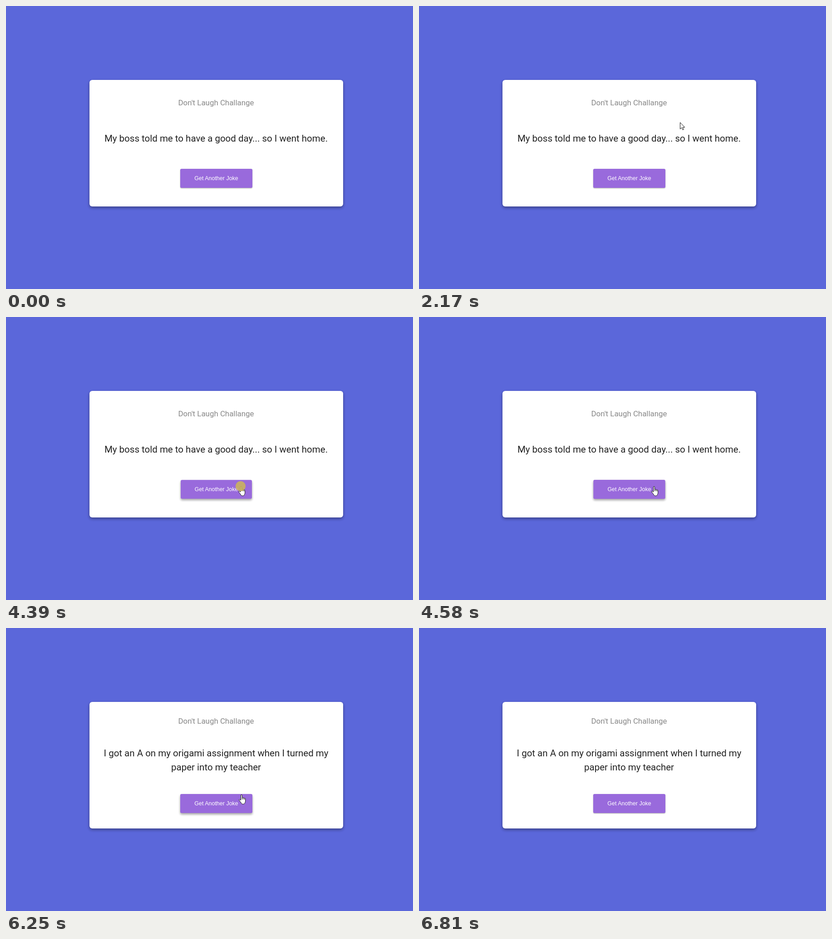
An HTML page for the animation above (8630 ms loop, 897 px wide and 624 px high).

```html
<!DOCTYPE html>
<html lang="en">
<head>
<meta charset="utf-8">
<title>Don't Laugh Challange</title>
<style>
  :root { --loop: 8630ms; }
  html, body { margin: 0; width: 100%; height: 100%; overflow: hidden; }
  body { background: #5b67da; position: relative; }

  .card, .btn, .text, .cursor, .cursor svg, .ring { position: absolute; }

  .card {
    left: 184px; top: 163px; width: 559px; height: 279px;
    background: #fff; border-radius: 6px;
    box-shadow: 0 3px 6px rgba(0,0,0,.16), 0 3px 6px rgba(0,0,0,.23);
  }

  .text { left: 0; top: 0; font-family: Roboto, sans-serif; text-anchor: middle; }
  .title { font-size: 16.9px; fill: #888; }
  .joke { font-size: 20.5px; fill: #222; }
  .first { animation: first var(--loop) step-end infinite; }
  .second { animation: second var(--loop) step-end infinite; }
  @keyframes first { 0% { visibility: visible } 53.65%, 100% { visibility: hidden } }
  @keyframes second { 0% { visibility: hidden } 53.65%, 100% { visibility: visible } }

  .btn {
    left: 384px; top: 359px; width: 159px; height: 42px;
    border-radius: 3px; background: #996adc; color: #fff;
    font: 12.5px/42px "Liberation Sans", Arial, sans-serif; text-align: center;
    animation: drop var(--loop) step-end infinite,
               hover var(--loop) linear infinite,
               press var(--loop) linear infinite;
  }
  @keyframes drop { 0% { top: 359px } 53.65%, 100% { top: 366px } }
  @keyframes hover {
    0%, 28.6%, 75.3%, 100% { box-shadow: 0 1px 3px rgba(0,0,0,.12), 0 1px 2px rgba(0,0,0,.24) }
    30.9%, 73% { box-shadow: 0 3px 5px rgba(0,0,0,.16), 0 3px 5px rgba(0,0,0,.24) }
  }
  @keyframes press {
    0%, 50.6%, 53.3%, 100% { transform: none }
    50.87% { transform: scale(.987) }
    51.5%, 52.2% { transform: scale(.98) }
  }

  /* The origin of .cursor is its hot spot */
  .cursor {
    left: 0; top: 0; width: 0; height: 0;
    animation: travel var(--loop) linear infinite, present var(--loop) step-end infinite;
  }
  .cursor svg { overflow: visible; fill: #fff; stroke: #111; stroke-linejoin: round; }
  .arrow { left: 0; top: 0; animation: arrow var(--loop) step-end infinite; }
  .hand { left: -6px; top: 0; animation: hand var(--loop) step-end infinite; }
  .ring {
    left: -12.5px; top: -11px; width: 22px; height: 22px; border-radius: 50%;
    background: rgba(204,181,88,.85);
    animation: ring var(--loop) step-end infinite;
  }
  @keyframes travel {
    0%, 19.81% { transform: translate(604px, 14px) }
    20.86% { transform: translate(614px, 45px) }
    22.6%  { transform: translate(620px, 105px) }
    23.87% { transform: translate(606px, 185px) }
    25.14%, 25.6% { transform: translate(575px, 256px) }
    26.5%  { transform: translate(551px, 302px) }
    27.4%  { transform: translate(532px, 338px) }
    28.3%  { transform: translate(521px, 357px) }
    29.3%  { transform: translate(518px, 364px) }
    30.9%, 72.4% { transform: translate(518px, 373px) }
    72.42%, 72.99% { transform: translate(519px, 367px) }
    73%    { transform: translate(523px, 352px) }
    74.16% { transform: translate(545px, 280px) }
    75.32% { transform: translate(566px, 215px) }
    76.48% { transform: translate(578px, 155px) }
    77.64% { transform: translate(584px, 75px) }
    78.6%, 100% { transform: translate(585px, 2px) }
  }
  @keyframes present { 0% { opacity: 0 } 19.81% { opacity: 1 } 78.9%, 100% { opacity: 0 } }
  @keyframes arrow { 0% { opacity: 1 } 28.5% { opacity: 0 } 73%, 100% { opacity: 1 } }
  @keyframes hand { 0% { opacity: 0 } 28.5% { opacity: 1 } 73%, 100% { opacity: 0 } }
  @keyframes ring { 0% { opacity: 0 } 50.86% { opacity: 1 } 52.6%, 100% { opacity: 0 } }
</style>
</head>
<body>
  <div class="card"></div>

  <svg class="text" width="897" height="624">
    <g class="first">
      <text class="title" x="463" y="219">Don't Laugh Challange</text>
      <text class="joke" x="463" y="299">My boss told me to have a good day... so I went home.</text>
    </g>
    <g class="second">
      <text class="title" x="463" y="211">Don't Laugh Challange</text>
      <text class="joke" x="463" y="283">I got an A on my origami assignment when I turned my</text>
      <text class="joke" x="463" y="314">paper into my teacher</text>
    </g>
  </svg>

  <div class="btn">Get Another Joke</div>

  <div class="cursor">
    <svg class="arrow" width="12" height="18">
      <path d="M.5 .8V15.3L3.9 12.2L6.2 17.2L8.4 16.2L6.2 11.4H10.7Z"/>
    </svg>
    <svg class="hand" width="16" height="22">
      <path d="M4.6 2C4.6 .1 7.4 .1 7.4 2V7.4C7.8 6.3 10 6.5 10 8C10.4 6.9 12.5 7.2 12.5 8.7C13 7.8 14.7 8.2 14.7 9.8V14.5C14.7 17 13.3 18 13.1 19.6C11.8 21.8 7 21.8 5.7 19.6C5.4 17.6 2.6 15.6 1 12.8C.1 11 2.2 10.2 3.3 11.5L4.6 13Z"/>
      <path d="M7.4 7.4V11M10 8V11M12.5 8.7V11.4" fill="none"/>
    </svg>
    <div class="ring"></div>
  </div>
</body>
</html>
```
